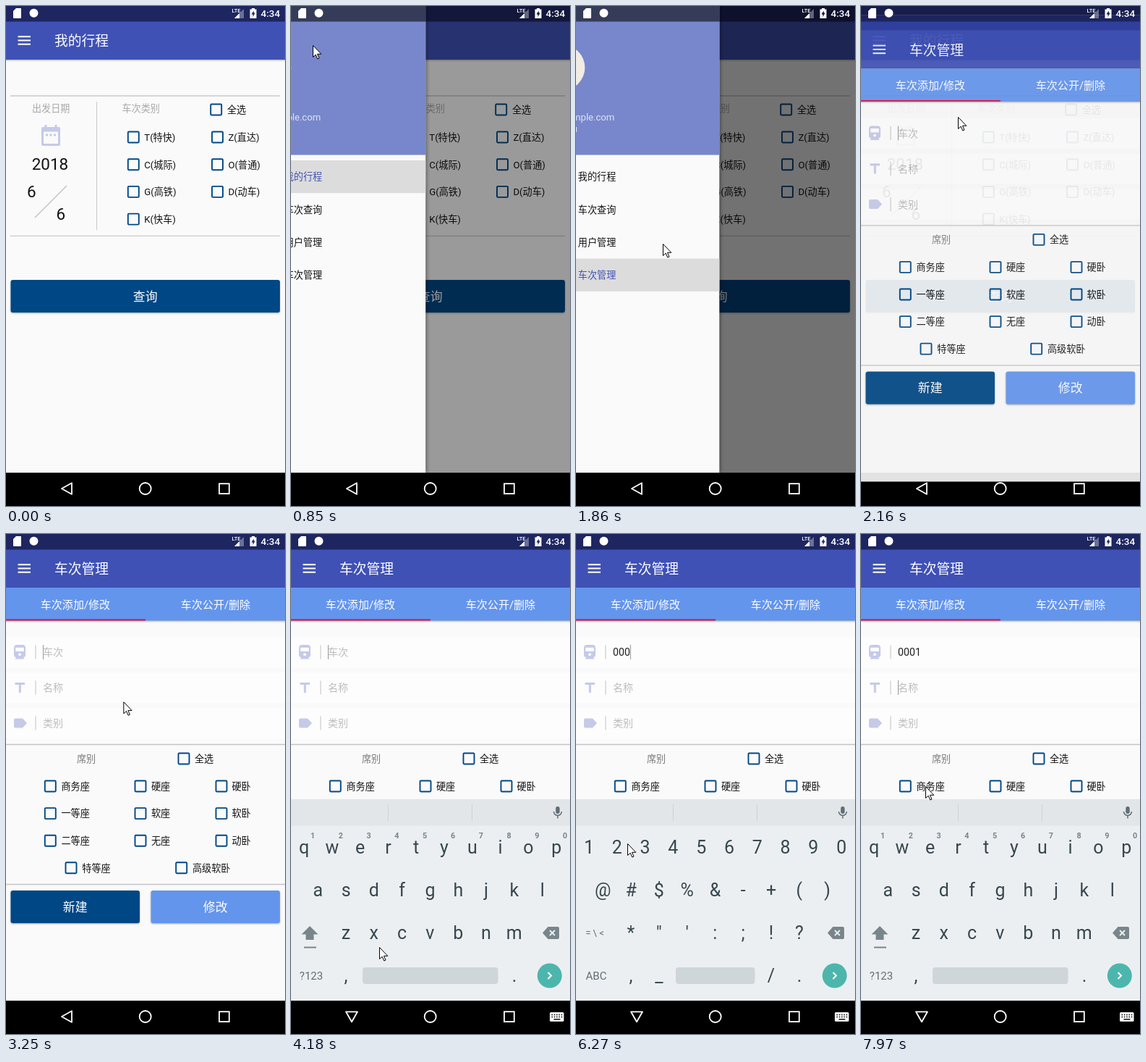
An HTML page for the animation above (8000 ms loop, 386x690 px).

```html
<!DOCTYPE html>
<html lang="zh-CN">
<head>
<meta charset="utf-8">
<style>
html, body { margin: 0; width: 100%; height: 100%; overflow: hidden; background: #000; }
svg { display: block; width: 100vw; height: 100vh; }
text { font-family: Roboto, "Noto Sans CJK SC", "Noto Sans CJK", sans-serif; white-space: pre; }
.raised { filter: drop-shadow(0 1.2px 1px #0005); }
</style>
</head>
<body>
<svg id="stage" viewBox="0 0 386 690"></svg>
<script>
const LOOP = 8000, STEP = 77.4;
const DRAWER_WIDTH = 263, PAGE_HEIGHT = 644, STATUS_HEIGHT = 21.5;
const INDIGO = '#3f51b5', PALE = '#c5cae9', NAVY = '#004785', SKY = '#6495ed', KEY = '#37474f', KEY_DIM = '#78868c';

// --- markup helpers; text is placed by its vertical centre ---
const escapeText = s => s.replace(/&/g, '&amp;').replace(/</g, '&lt;');
const text = (x, cy, s, { size = 13.14, fill = '#111', anchor = 'start', weight = 400, id = '' } = {}) =>
  `<text id="${id}" x="${x}" y="${cy + size * 0.37}" font-size="${size}" fill="${fill}" text-anchor="${anchor}" font-weight="${weight}">${escapeText(s)}</text>`;
const centered = (x, cy, s, size, fill, weight) => text(x, cy, s, { size, fill, weight, anchor: 'middle' });
const rect = (x, y, w, h, fill, extra = '') =>
  `<rect x="${x}" y="${y}" width="${w}" height="${h}" fill="${fill}" ${extra}/>`;
const shape = (d, fill, extra = '') => `<path d="${d}" fill="${fill}" fill-rule="evenodd" ${extra}/>`;
const line = (d, stroke, width = 1, extra = '') =>
  `<path d="${d}" fill="none" stroke="${stroke}" stroke-width="${width}" ${extra}/>`;
const circle = (x, y, r, fill, extra = '') => `<circle cx="${x}" cy="${y}" r="${r}" fill="${fill}" ${extra}/>`;
const group = (id, body, extra = '') => `<g id="${id}" ${extra}>${body}</g>`;

const checkbox = (x, cy, labelX, label) =>
  rect(x - 7.5, cy - 7.5, 15, 15, 'none', `rx="1.2" stroke="${NAVY}" stroke-width="1.9"`) + text(labelX, cy, label);
const button = (x, y, w, fill, label) =>
  rect(x, y, w, 45, fill, 'rx="3" class="raised"') + centered(x + w / 2, y + 22.5, label, 16.9, '#fff');

const appBar = title =>
  rect(0, 0, 386, PAGE_HEIGHT, '#fafafa') +
  rect(-6, 21, 398, 53, INDIGO, 'class="raised"') +
  rect(0, 0, 386, STATUS_HEIGHT, '#303f9f') +
  line('M16.5 42.2h17.5m-17.5 5.3h17.5m-17.5 5.3h17.5', '#fff', 1.9) +
  text(67, 48.2, title, { size: 18.77, fill: '#fff' });

// --- trip page ---
function tripPage() {
  const rule = '#c9c9c9', gray = '#a9a9a9';
  const options = ['T(特快)', 'Z(直达)', 'C(城际)', 'O(普通)', 'G(高铁)', 'D(动车)', 'K(快车)'];
  return appBar('我的行程') +
    line('M6 124H379M6 317.3H379', rule, 1.3) + line('M125.5 132V309', rule) +
    text(36, 141, '出发日期', { fill: gray }) + text(160.5, 141, '车次类别', { fill: gray }) +
    shape('M51 167h2.5v-3h3v3h11v-3h3v3H73q2 0 2 2v22q0 2-2 2H51q-2 0-2-2V169q0-2 2-2zM52 173.5v16.5h20v-16.5z', PALE) +
    [55, 60.5, 66].map(x => rect(x, 176.5, 3, 3, PALE)).join('') +
    text(35.7, 218, '2018', { size: 22.5 }) + text(29, 256, '6', { size: 22.5 }) + text(69.5, 287, '6', { size: 22.5 }) +
    line('M40 292L84 248', '#bbb', 1.2) +
    checkbox(290.7, 143, 306, '全选') +
    options.map((label, i) => {
      const right = i % 2;
      return checkbox(right ? 292.5 : 176.3, 181 + 37.7 * (i >> 1), right ? 307.5 : 191.3, label);
    }).join('') +
    button(6.5, 378, 372.5, NAVY, '查询');
}

// --- management page ---
function managePage() {
  const rows = ['商务座 硬座 硬卧', '一等座 软座 软卧', '二等座 无座 动卧'];
  const hints = ['车次', '名称', '类别'];
  return appBar('车次管理') +
    rect(-6, 74, 398, 45.5, SKY, 'class="raised"') +
    centered(96, 97, '车次添加/修改', 15.02, '#fff') + centered(290, 97, '车次公开/删除', 15.02, '#fff') +
    rect(0, 117.5, 193, 2, '#dc143c') +
    hints.map((hint, i) => {
      const cy = 163 + 49 * i;
      return rect(0, cy - 20.5, 386, 42, '#fdfdfd') + line(`M41 ${cy - 9.5}v19`, '#ccc', 1.2) +
        text(51, cy, hint, { size: 14.08, fill: '#bdbdbd', id: 'hint' + i });
    }).join('') +
    shape('M15 153h8q4 0 4 4v10q0 3-3 3l1.5 2.5h-13l1.5-2.5q-3 0-3-3v-10q0-4 4-4zM13.2 156.7v5.3h11.6v-5.3z', PALE) +
    circle(19, 166.2, 1.9, '#fdfdfd') +
    rect(12.5, 205, 13.5, 3, PALE) + rect(17.8, 205, 3, 14, PALE) +
    shape('M13 254.5h10l6 6.5-6 6.5H13q-2 0-2-2v-9q0-2 2-2z', PALE) +
    text(51, 163, '', { size: 14.2, fill: '#222', id: 'value' }) +
    rect(0, 0, 1, 20, '#999', 'id="caret"') +
    line('M0 290.5H386M0 483.5H386', '#c4c4c4', 1.3) +
    text(98, 310, '席别', { fill: '#7b7b7b' }) + checkbox(246, 310, 261, '全选') +
    rows.map((row, r) => row.split(' ').map((label, c) =>
      checkbox([61.3, 186, 298][c], 348 + 37.6 * r, [76.5, 201, 312.5][c], label)).join('')).join('') +
    checkbox(90, 460.7, 105.3, '特等座') + checkbox(242.7, 460.7, 258, '高级软卧') +
    button(6.5, 492, 178.5, NAVY, '新建') + button(200.5, 492, 178.5, SKY, '修改');
}

// --- navigation drawer ---
const drawerItems = ['我的行程', '车次查询', '用户管理', '车次管理'];
const drawerMarkup = () =>
  rect(0, 0, DRAWER_WIDTH, PAGE_HEIGHT, '#fafafa', 'style="filter:drop-shadow(1px 0 2.5px #0007)"') +
  rect(0, 0, DRAWER_WIDTH, 205.5, '#7887cb') + rect(0, 0, DRAWER_WIDTH, STATUS_HEIGHT, '#000', 'opacity=".27"') +
  circle(46, 85, 31, '#f1ece4') +
  text(118, 153, 'user@example.com', { fill: '#dfe3f4', anchor: 'end' }) +
  text(15, 172, '普通用户', { fill: '#fff' }) +
  rect(0, 0, DRAWER_WIDTH, 45.2, '#dcdcdc', 'id="selection"') +
  drawerItems.map((s, i) => text(67.5, 235.6 + 45.2 * i, s, { id: 'item' + i })).join('');

// --- soft keyboard ---
const keyRow = (chars, x, cy) =>
  [...chars].map((c, i) => centered(x + 38.8 * i, cy, c, 25, KEY)).join('');
const spaceBar = (x, w) => rect(x, 598, w, 23, '#cfd6d9', 'rx="4"');
const keyboardMarkup = () =>
  rect(0, 366, 386, PAGE_HEIGHT - 366, '#eceff1') + rect(0, 366, 386, 36.5, '#e2e6e8') +
  line('M134.5 373v23M250.5 373v23', '#cdd2d5') +
  rect(366.3, 376, 5.4, 10, '#5f6e75', 'rx="2.7"') + line('M363.5 383a5.5 5.5 0 0 0 11 0M369 388.5v4', '#5f6e75', 1.5) +
  group('letters',
    keyRow('qwertyuiop', 18, 432) + keyRow('asdfghjkl', 37.3, 491) + keyRow('zxcvbnm', 76, 550) +
    [...'1234567890'].map((c, i) => centered(30 + 38.8 * i, 415.7, c, 10.8, KEY_DIM, 700)).join('') +
    shape('M26 541L37.5 552.5H31.5V560H20.5V552.5H14.5z', KEY_DIM) + rect(18, 569.5, 17, 2, KEY_DIM) +
    centered(28, 609, '?123', 15, '#5f6e75') + spaceBar(99, 187.5)) +
  group('symbols',
    keyRow('1234567890', 18, 432) + keyRow('@#$%&-+()', 37.3, 491) + keyRow('*"\':;!?', 76, 550) +
    centered(26, 550, '= \\ <', 13, '#5f6e75') + centered(28, 609, 'ABC', 15, '#5f6e75') +
    keyRow('_', 115, 609) + spaceBar(138, 109.5) + keyRow('/', 270, 609)) +
  keyRow(',', 76, 609) + keyRow('.', 309, 609) +
  shape('M355.5 542h13.5q2 0 2 2v13q0 2-2 2h-13.5l-7.5-8.5z', KEY_DIM) + line('M358 547l7 7m0-7l-7 7', '#eceff1', 1.8) +
  circle(357.8, 609.5, 17, '#4db6ac') + line('M355.5 605l4.5 4.5-4.5 4.5', '#fff', 2);

// --- system icons ---
const systemIcons = () =>
  shape('M14 3h6q1 0 1 1v12q0 1-1 1h-9q-1 0-1-1V7z', '#fff') + circle(38.5, 9.7, 6, '#fff') +
  text(312.5, 6, 'LTE', { size: 7.5, fill: '#fff', weight: 500 }) +
  shape('M329 4v13h-13z', '#fff', 'opacity=".35"') + shape('M323 10v7h-7z', '#fff') +
  shape('M340 3h4v1.5h2.5v12.5h-9V4.5h2.5zM342.8 6.5l-3.3 5h2v3.5l3.3-5.5h-2z', '#fff') +
  text(352.5, 10.5, '4:34', { size: 13.5, fill: '#fff', weight: 500 }) +
  line('', '#fff', 1.8, 'id="back" stroke-linejoin="round"') +
  circle(192.7, 666, 8, 'none', 'stroke="#fff" stroke-width="1.8"') +
  rect(295, 659.2, 13.8, 13.8, 'none', 'stroke="#fff" stroke-width="1.8"') +
  group('imeIcon', rect(358, 660, 19.5, 12.7, '#fff', 'rx="1.5"') +
    line('M360.5 663.5h15M360.5 666.4h15', '#000', 1.5, 'stroke-dasharray="1.6 1.7"') +
    line('M363.5 669.7h9', '#000', 1.4));

document.getElementById('stage').innerHTML =
  rect(0, 0, 386, 690, '#000') +
  group('trip', tripPage()) +
  rect(0, 0, 386, PAGE_HEIGHT, '#000', 'id="scrim"') +
  group('drawer', drawerMarkup()) +
  group('manage', managePage()) +
  group('keyboard', keyboardMarkup()) +
  rect(0, 0, 386, STATUS_HEIGHT, '#000', 'opacity=".4"') +
  systemIcons() +
  group('cursor', shape('M.5 .5V16.5L4.2 13.2L6.8 19L9 18L6.5 12.3H11.8z', '#fff', 'stroke="#000"'));

// --- motion ---
// Pointer stops: step, x, y
const pointerPath = [
  [1, 264, 525], [8, 30, 54], [12, 30, 54], [20, 118, 372], [23, 118, 372], [24, 120, 328],
  [28, 134, 153], [31, 160, 136], [34, 175, 131], [38, 233, 362], [44, 127, 166], [49, 126, 167],
  [54, 122, 570], [58, 38, 600], [59, 37, 605], [63, 37, 605], [65, 33, 613], [66, 33, 613],
  [73, 371, 433], [79, 371, 435], [81, 71, 427], [84, 8, 435], [89, 8, 435], [93, 88, 219],
  [101, 88, 219], [103, 89, 348]
];
const typing = [[75, '0'], [77, '00'], [79, '000'], [89, '0001']];
const SELECT_AT = 24, SYMBOLS_AT = 65, NEXT_FIELD_AT = 97;
const PAGE_ENTER = 2077;

const $ = id => document.getElementById(id);
const set = (id, attrs) => { for (const k in attrs) $(id).setAttribute(k, attrs[k]); };
const show = (id, on) => set(id, { visibility: on ? 'visible' : 'hidden' });
const progress = (t, start, duration) => Math.min(1, Math.max(0, (t - start) / duration));
const easeOut = (p, power) => 1 - (1 - p) ** power;

const drawerOpen = t => easeOut(progress(t, 775, 350), 5) - easeOut(progress(t, 1838.4, 350), 5);

function pointerAt(step) {
  const next = pointerPath.findIndex(p => p[0] > step);
  if (next < 0) return pointerPath.at(-1).slice(1);
  const [s0, x0, y0] = pointerPath[Math.max(0, next - 1)], [s1, x1, y1] = pointerPath[next];
  const p = progress(step, s0, s1 - s0);
  return [x0 + (x1 - x0) * p, y0 + (y1 - y0) * p];
}

function render(time) {
  const step = Math.floor((time + 8) / STEP), t = step * STEP;

  show('cursor', step >= 1);
  set('cursor', { transform: `translate(${pointerAt(step)})` });

  const open = drawerOpen(t), selected = step >= SELECT_AT ? 3 : 0;
  show('drawer', open > 0.002);
  set('drawer', { transform: `translate(${DRAWER_WIDTH * (open - 1)})` });
  set('selection', { y: 213 + 45.2 * selected });
  drawerItems.forEach((_, i) => set('item' + i, { fill: i === selected ? INDIGO : '#111' }));

  // The leaving page dims while the new one fades and slides in.
  const leaving = 0.3 * progress(t, PAGE_ENTER, 130);
  set('scrim', { opacity: Math.max(0.6 * drawerOpen(t - 12), leaving) });
  set('manage', {
    opacity: easeOut(progress(t, PAGE_ENTER, 200), 4),
    transform: `translate(0 ${55 * (1 - easeOut(progress(t, PAGE_ENTER, 350), 5))})`
  });

  const rise = easeOut(progress(t, 3860, 220), 2), symbols = step >= SYMBOLS_AT && step < NEXT_FIELD_AT;
  set('keyboard', { opacity: rise, transform: `translate(0 ${40 * (1 - rise)})` });
  set('letters', { display: symbols ? 'none' : 'inline' });
  set('symbols', { display: symbols ? 'inline' : 'none' });
  show('imeIcon', rise > 0);
  set('back', { d: rise > 0 ? 'M76 659.3H92L84 673.2z' : 'M91 658.2V673.8L77 666z' });

  const [typedStep, value] = typing.filter(([s]) => s <= step).at(-1) || [0, ''];
  $('value').textContent = value;
  show('hint0', !value);
  const inNextField = step >= NEXT_FIELD_AT;
  const blinkStart = typedStep ? typedStep * STEP : 2060;
  set('caret', {
    x: inNextField ? 51 : 51 + 8 * value.length,
    y: inNextField ? 202 : 153,
    opacity: inNextField || (t >= blinkStart && (t - blinkStart) % 1000 < 500) ? 1 : 0
  });
}

const start = performance.now();
function tick() {
  render((performance.now() - start) % LOOP);
  requestAnimationFrame(tick);
}
tick();
</script>
</body>
</html>
```
